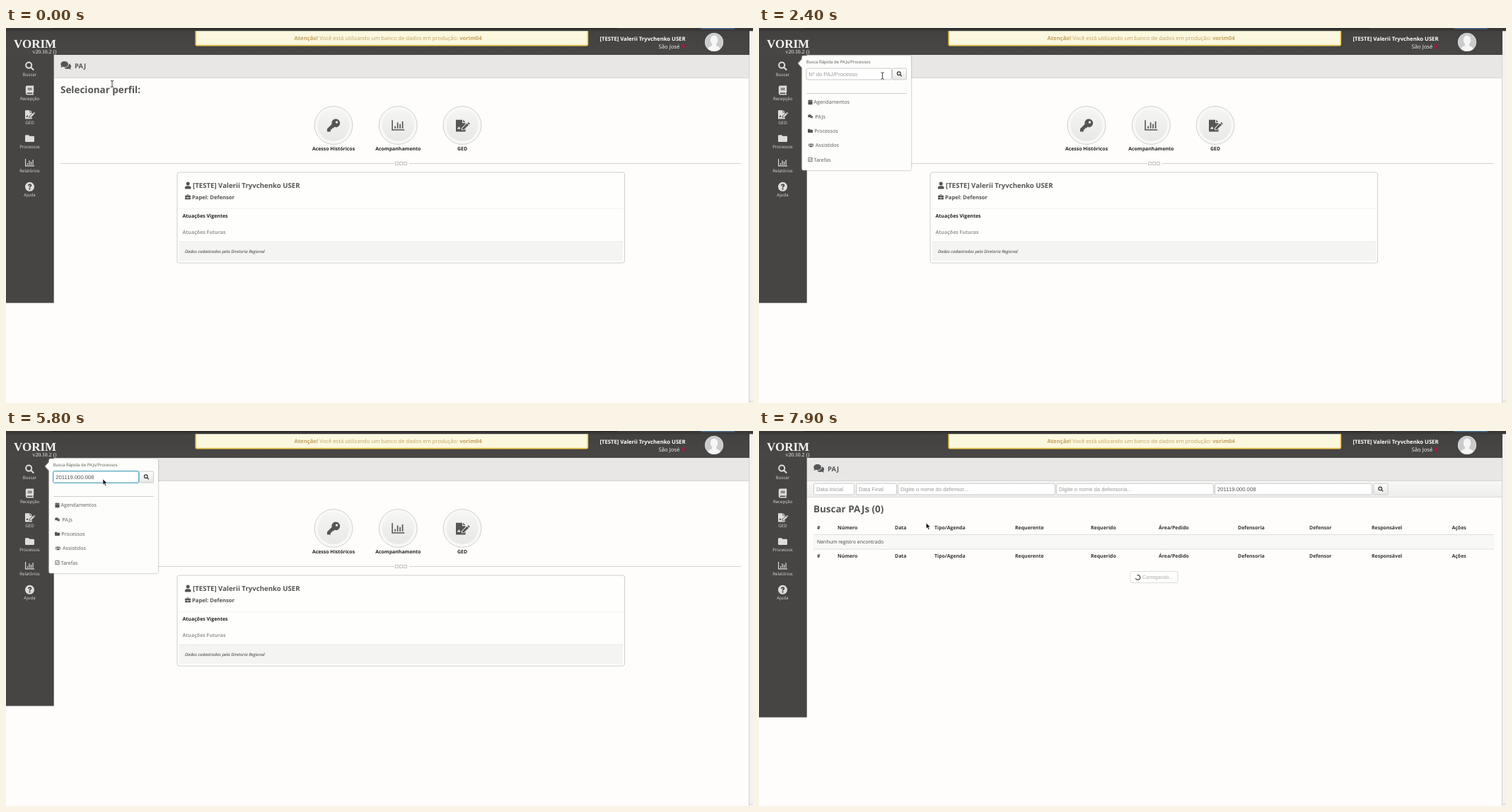
Write an HTML page that moves like this. It is 1056x530 px and loops after 8 s.

```html
<!DOCTYPE html>
<html lang="pt-BR">
<head>
<meta charset="utf-8">
<title>PAJ</title>
<style>
html, body { margin: 0; width: 100%; height: 100%; overflow: hidden; background: #fefdfb; }
svg { display: block; width: 1056px; height: 530px; }
text { font-family: "Open Sans", "Noto Sans", sans-serif; text-rendering: geometricPrecision; white-space: pre; }
.b { font-weight: 700; }
.i { font-style: italic; }
.m { text-anchor: middle; }
.e { text-anchor: end; }
.a { font-family: "Liberation Sans", Arial, sans-serif; }
.s { font-family: "Liberation Serif", Times, serif; }
</style>
</head>
<body>
<svg id="stage" viewBox="0 0 1056 530" xmlns="http://www.w3.org/2000/svg"></svg>
<script>
const DARK = '#464543', INK = '#555', PALE = '#dedddb', LINE = '#d3d3d1';

const text = (x, y, size, fill, str, cls = '') =>
  `<text x="${x}" y="${y}" font-size="${size}" fill="${fill}" class="${cls}">${str}</text>`;
const rect = (x, y, w, h, fill, more = '') =>
  `<rect x="${x}" y="${y}" width="${w}" height="${h}" fill="${fill}" ${more}/>`;
const line = (x1, y, x2, color, more = '') =>
  `<path d="M${x1} ${y}H${x2}" stroke="${color}" ${more}/>`;
const group = (id, body) => `<g id="${id}">${body}</g>`;

// Icons live in a 16 x 16 box and take their colour from the group
const fill = d => `<path fill="currentColor" fill-rule="evenodd" d="${d}"/>`;
const pen = (d, w) => `<path fill="none" stroke="currentColor" stroke-width="${w}" d="${d}"/>`;
const icons = {
  search: pen('M11.4 6.5a5 5 0 1 1-10 0a5 5 0 1 1 10 0M10 10L15 15', 2.5),
  book: fill('M3.5 0H15V12H14V14.5H15V16H3.5Q1 16 1 13.5V2.5Q1 0 3.5 0ZM4.5 4V5.2H12V4ZM4.5 6.5V7.7H12V6.5ZM4 12.3a1 1 0 0 0 0 2H12.5V12.3Z'),
  sign: fill('M0 1H8V5H12V6.5L7 11.5V14H10.5L12 12.5V16H0ZM2 12.7H5.5V11.7L4 9.5L2 11.7ZM9 1L12 4H9ZM8 11.8L14 5.6L16 7.6L10 13.4H8ZM14.6 5L15.6 4L17.6 6L16.6 7Z'),
  folder: fill('M1.5 2H6L8 4H14.5Q16 4 16 5.5V12.5Q16 14 14.5 14H1.5Q0 14 0 12.5V3.5Q0 2 1.5 2Z'),
  chart: pen('M.7 1.5V13.8H16', 1.4) + pen('M4.3 12V9M7.4 12V4.5M10.5 12V6.5M13.6 12V3', 1.5),
  help: fill('M8 0a8 8 0 1 1 0 16a8 8 0 1 1 0-16ZM4.5 5.5L6.5 6.7Q7 5.2 8.2 5.2Q9.2 5.4 8.9 6.4Q6.7 7.6 6.9 9.5H9.2Q9.2 8.5 11 7.4Q12.1 5 10.4 3.7Q6.6 1.9 4.5 5.5ZM8 10.5a1.4 1.4 0 1 0 .01 0Z'),
  key: fill('M10.8 0a5.2 5.2 0 1 1-1.6 10.1L7.8 11.5H6V13.3H4.3V16H0V12.4L5.8 6.6A5.2 5.2 0 0 1 10.8 0ZM12 2.6a1.5 1.5 0 1 0 .01 0Z'),
  chat: fill('M6 1.5C9.5 1.5 11.6 3.6 11.6 6S9.5 10.4 6 10.4Q4.5 10.4 3.4 9.9Q1.8 11 0 11Q1.2 9.8 1.3 8.6Q.2 7.4 .2 6C.2 3.6 2.5 1.5 6 1.5ZM12.6 5.3C15 6 16 7.4 16 9Q16 10.5 14.9 11.6Q15 12.8 16.2 14Q14.2 14 12.7 12.9C9.4 13.7 6.8 12.9 5.6 11.4C9.7 11.4 12.8 8.8 12.6 5.3Z'),
  user: fill('M8 0a4 4 0 1 1 0 8a4 4 0 1 1 0-8ZM5 9H11Q15 9.4 15 13V14.5Q15 16 13.5 16H2.5Q1 16 1 14.5V13Q1 9.4 5 9Z'),
  case: fill('M5 4V2.5Q5 1 6.5 1H9.5Q11 1 11 2.5V4H16V9H0V4ZM6.5 4H9.5V2.5H6.5ZM0 10H6V11.5H10V10H16V15H0Z'),
  date: fill('M1 2H4V0H6V2H10V0H12V2H15V5H1ZM1 6H15V16H1Z'),
  users: fill('M8 2a3 3 0 1 1 0 6a3 3 0 1 1 0-6ZM6 9H10Q13 9.5 13 13.5H3Q3 9.5 6 9ZM2.3 3a2 2 0 1 1 0 4a2 2 0 1 1 0-4ZM13.7 3a2 2 0 1 1 0 4a2 2 0 1 1 0-4ZM-1 11Q-1 8 1 8H4Q2.3 9 2 11ZM17 11Q17 8 15 8H12Q13.7 9 14 11Z'),
  check: pen('M2 2H14V14H2Z', 1.8) + pen('M4.5 7.5L7.3 10.3L12 5.3', 2),
  pin: fill('M8 0a5 5 0 0 1 5 5Q13 9 8 16Q3 9 3 5a5 5 0 0 1 5-5Z'),
  down: pen('M2 5L8 11L14 5', 3)
};
const icon = (name, cx, cy, size, color) =>
  `<g color="${color}" transform="translate(${cx - size / 2} ${cy - size / 2}) scale(${size / 16})">${icons[name]}</g>`;

const input = (x, y, w, h, stroke = '#c9c9c7') =>
  rect(x + .5, y + .5, w - 1, h - 1, '#fff', `rx="1.5" stroke="${stroke}"`);
const searchButton = (x, y, h) =>
  rect(x + .5, y + .5, 20, h - 1, 'url(#btn)', 'rx="1.5" stroke="#cbcbc9"') + icon('search', x + 10.5, y + h / 2, 7.5, '#333');

const defs = `<defs>
  <linearGradient id="top" x2="0" y2="1"><stop stop-color="#424140"/><stop offset="1" stop-color="#484745"/></linearGradient>
  <linearGradient id="btn" x2="0" y2="1"><stop stop-color="#fff"/><stop offset="1" stop-color="#e8e8e6"/></linearGradient>
  <linearGradient id="bar" x2="0" y2="1"><stop stop-color="#f8f8f6"/><stop offset="1" stop-color="#ededeb"/></linearGradient>
  <linearGradient id="disc" x2="0" y2="1"><stop stop-color="#f5f5f3"/><stop offset="1" stop-color="#e8e8e6"/></linearGradient>
  <filter id="shade" x="-10%" y="-10%" width="120%" height="120%"><feDropShadow dx="0" dy="0" stdDeviation="1.3" flood-color="#949492"/></filter>
  <filter id="glow" x="-10%" y="-40%" width="120%" height="180%"><feDropShadow dx="0" dy="0" stdDeviation="1.3" flood-color="#3fa9c9" flood-opacity=".7"/></filter>
  <clipPath id="face"><circle cx="1001" cy="20" r="13"/></clipPath>
</defs>`;

function header() {
  const banner = `<text x="540" y="17.2" font-size="7.7" fill="#c3a25e" class="m"><tspan class="b">Atenção!</tspan> Você está utilizando um banco de dados em produção: <tspan class="b">vorim04</tspan></text>`;
  return rect(0, 0, 1051, 38, 'url(#top)') + rect(0, 0, 1056, 4.3, '#393837') + rect(64, 0, 800, 1.2, '#252525') +
    rect(982, 0, 48, 1.5, '#44698c', 'rx="1"') +
    '<path d="M268.3 4.3V22.8Q268.3 24.6 270 24.6H820.5Q822.3 24.6 822.3 22.8V4.3" fill="#fcf8e0" stroke="#f1ca55" stroke-width="1.7"/>' +
    banner +
    text(11, 27.6, 17, '#f4f4f2', 'VORIM', 's b') + text(71.5, 36, 7.7, '#f4f4f2', 'v20.10.2 ()', 's e') +
    text(960.5, 17.8, 7.7, '#fff', '[TESTE] Valerii Tryvchenko USER', 'b e') +
    text(922.5, 29.3, 7.7, '#f4f4f2', 'São José') + icon('pin', 957.3, 26.5, 8, '#8f2440') +
    `<g clip-path="url(#face)">${rect(988, 7, 26, 26, '#cbcbcb')}
      <ellipse cx="1001" cy="17" rx="5.2" ry="6.6" fill="#f6f6f6"/>
      <path d="M998 21H1004V25Q1010 27 1012 33H990Q992 27 998 25Z" fill="#f6f6f6"/></g>
    <circle cx="1001" cy="20" r="12.7" fill="none" stroke="#dcdcda" stroke-width=".8"/>`;
}

function sidebar() {
  const items = [['search', 'Buscar'], ['book', 'Recepção'], ['sign', 'GED'], ['folder', 'Processos'], ['chart', 'Relatórios'], ['help', 'Ajuda']];
  return `<rect id="side" y="37" width="67.7" fill="${DARK}"/>` + items.map(([name, label], i) =>
    icon(name, 33.5, 53.8 + 34.1 * i, 13, PALE) + text(33.5, 67.6 + 34.1 * i, 6.1, PALE, label, 'm')).join('');
}

const titleBar = () => rect(67.7, 38, 982.3, 33, '#e8e7e6') + line(67.7, 70.5, 1050, '#d6d5d3') +
  icon('chat', 84.6, 53, 15, INK) + text(97, 57.3, 9.4, INK, 'PAJ', 'b');

function profile() {
  const discs = [['key', 463, 'Acesso Históricos'], ['chart', 554.3, 'Acompanhamento'], ['sign', 645, 'GED']];
  return text(77, 92.4, 13.45, INK, 'Selecionar perfil:', 'b') +
    discs.map(([name, x, label]) =>
      `<circle cx="${x}" cy="137.5" r="26.9" fill="#f8f8f6" stroke="#cfcfcd"/>
       <circle cx="${x}" cy="137.5" r="22.5" fill="url(#disc)"/>` +
      icon(name, x, 137.5, 18, INK) + text(x, 172.8, 6.95, '#222', label, 'b m')).join('') +
    line(77, 191.5, 549, LINE) + line(570, 191.5, 1039, LINE) +
    [550.5, 556.5, 562.5].map(x => rect(x, 189.5, 4, 4, 'none', 'stroke="#c4c4c2"')).join('') +
    rect(242, 204, 632.5, 128, '#fefefc', 'rx="3" stroke="#cfcfcd"') +
    icon('user', 257.2, 222.5, 10, INK) + text(264, 226.1, 9.63, INK, '[TESTE] Valerii Tryvchenko USER', 'b') +
    icon('case', 257, 238.8, 8, INK) + text(263, 241.6, 7.65, INK, 'Papel: Defensor', 'b') +
    line(245, 255.5, 872, '#e6e6e4', 'stroke-dasharray="1 1"') +
    text(249.5, 267.6, 7, '#222', 'Atuações Vigentes', 'b') + text(249.5, 290.6, 7, '#999', 'Atuações Futuras', 'b') +
    rect(245, 302, 627, 27, '#f4f4f2') + line(245, 302, 872, '#d9d9d7', 'stroke-dasharray="1 1"') +
    text(253, 317.7, 6, '#333', 'Dados cadastrados pela Diretoria Regional', 'i');
}

function results() {
  const fields = [[77, 58, 'Data Inicial'], [137, 58, 'Data Final'], [196, 223, 'Digite o nome do defensor...'],
    [420, 223, 'Digite o nome da defensoria...'], [644, 223, '201119.000.008']];
  const cols = [[82, '#'], [111, 'Número'], [192, 'Data'], [248, 'Tipo/Agenda'], [362, 'Requerente'], [469, 'Requerido'],
    [565, 'Área/Pedido'], [677, 'Defensoria'], [778, 'Defensor'], [866, 'Responsável'], [979.5, 'Ações']];
  const heads = y => cols.map(([x, s]) => text(x, y, 6.95, '#333', s, 'b')).join('');
  const table = heads(105.8) + rect(77, 113.5, 962, 20.5, '#f8f8f6') +
    line(77, 113.5, 1039, '#dededc') + line(77, 134, 1039, '#dededc') +
    text(82, 126.2, 6.95, '#444', 'Nenhum registro encontrado') + heads(146.3);
  const loading = rect(485.5, 165.5, 67, 16, '#fefefc', 'rx="2" stroke="#dcdcda"') +
    '<circle id="spin" cx="496" cy="174" r="3.3" fill="none" stroke="#444" stroke-width="1.2" pathLength="4" stroke-dasharray="3 1"/>' +
    text(502.5, 176, 7.15, '#aaa', 'Carregando...', 'a');
  const more = icon('down', 563.8, 173.4, 7, '#1b86b5') + text(569, 176.2, 7.7, '#1b86b5', 'Carregar mais...', 'a');
  return rect(68, 71, 982, 22.5, 'url(#bar)') + line(68, 93.5, 1050, '#dcdcda') +
    fields.map(([x, w, s], i) => input(x, 73.7, w, 16.8) + text(x + 4, 84.8, 7.7, i < 4 ? '#999' : INK, s, 'a')).join('') +
    searchButton(868.5, 73.7, 16.8) +
    group('heading', text(77, 115.2, 13.45, INK, 'Buscar PAJs (0)', 'b')) +
    group('table', table) + group('loading', loading) + group('more', more);
}

function popup() {
  const items = [['date', 77.5, 'Agendamentos'], ['chat', 79.3, 'PAJs'], ['folder', 78.3, 'Processos'], ['users', 80, 'Assistidos'], ['check', 77.5, 'Tarefas']];
  return '<path d="M62.5 39.3H213Q215 39.3 215 41.3V199Q215 201 213 201H62.5Q60.7 201 60.7 199V56L55.2 50L60.7 44V41.3Q60.7 39.3 62.5 39.3Z" fill="#fdfdfb" filter="url(#shade)"/>' +
    text(66.7, 49.6, 6.05, INK, 'Busca Rápida de PAJs/Processos') +
    searchButton(188, 56.5, 17) + input(66.5, 56.5, 121.5, 17) +
    group('focus', `<g filter="url(#glow)">${input(66.5, 56.5, 121.5, 17, '#5aa9bd')}</g>`) +
    group('hint', text(70.2, 67.7, 7.7, '#999', 'Nº do PAJ/Processo', 'a')) +
    group('typed', text(70.2, 67.7, 7.7, INK, '201119.000.008', 'a')) +
    rect(70, 60, .8, 10, '#222', 'id="caret"') +
    line(67, 92.5, 209, '#cfcfcd') +
    items.map(([name, x, label], i) => icon(name, name == 'users' ? 73.5 : 72.5, 104.7 + 20.35 * i, 7, INK) +
      text(x, 107.4 + 20.35 * i, 7.15, INK, label)).join('');
}

const tooltip = () => rect(15, 75, 37, 11.5, '#3a3937', 'rx="1" opacity=".85"') + text(33.5, 82.7, 6.05, '#fff', 'Pesquisar', 'm');

const cursors = {
  beam: '<path d="M-2.2-4.7Q0-4.7 0-3.5Q0-4.7 2.2-4.7M0-4V4M-2.2 4.7Q0 4.7 0 3.5Q0 4.7 2.2 4.7" fill="none" stroke="#333" stroke-width=".9"/>',
  arrow: '<path d="M0 0V8L1.9 6.3L3.3 9.4L4.7 8.8L3.3 5.8H6Z" fill="#111" stroke="#fff" stroke-width=".5"/>',
  hand: '<path d="M-1.3-4Q-.4-5 .3-4V-1L3.6-.2Q4.6.2 4.4 1.5L3.6 5H-1.2L-3.6 1.4Q-3.6.2-2.4.7L-1.3 1.6Z" fill="#111" stroke="#fff" stroke-width=".6"/>'
};

const stage = document.getElementById('stage');
stage.innerHTML = defs + rect(0, 0, 1056, 530, '#fefdfb') + rect(1050, 4, 6, 526, '#f3f2f0') +
  '<path d="M1050.5 4V530M1050 527.5H1056" stroke="#d4d3d1"/>' +
  titleBar() + group('profile', profile()) + group('results', results()) + sidebar() + header() +
  group('tip', tooltip()) + group('popup', popup()) +
  Object.keys(cursors).map(k => group(k, cursors[k])).join('');

const $ = id => document.getElementById(id);
const show = (id, on) => $(id).setAttribute('display', on ? 'inline' : 'none');
const move = (id, x, y) => $(id).setAttribute('transform', `translate(${x} ${y})`);

// Pointer path: time, x, y
const path = [[0, 150, 79], [400, 150, 79], [700, 33.5, 56.5], [1300, 33.5, 56.5], [1700, 184, 67], [2300, 184, 67],
  [2500, 165, 68], [2700, 184, 68.5], [2800, 184, 68.5], [2900, 123, 69], [3000, 137, 69], [4700, 137, 69],
  [4800, 137, 68], [7000, 137, 68], [7700, 236.3, 130], [8000, 236.3, 130]];
function pointer(t) {
  const i = path.findIndex(p => p[0] > t), [t0, x0, y0] = path[i - 1], [t1, x1, y1] = path[i];
  const k = (t - t0) / (t1 - t0);
  return [x0 + (x1 - x0) * k, y0 + (y1 - y0) * k];
}

const between = (t, a, b) => t >= a && t < b;

function draw(t) {
  const loaded = t >= 6500, done = t >= 7100, typed = t >= 4000;
  show('profile', !loaded);
  show('results', loaded);
  $('side').setAttribute('height', (done ? 404.7 : loaded ? 368.7 : 388.6) - 37);

  const left = Math.max(0, 1 - Math.max(0, t - 700) / 800) ** 2;
  show('popup', t > 700 && !loaded);
  $('popup').setAttribute('opacity', 1 - left);
  move('popup', -10 * left, 0);
  show('tip', between(t, 900, 1400));
  show('focus', t >= 2600);
  show('hint', !typed);
  show('typed', typed);
  show('caret', between(t, 2700, 3200) || between(t, 3600, 4600) || between(t, 5300, 5800));
  $('caret').setAttribute('x', typed ? 125.6 : 70);

  show('heading', done);
  show('more', !done);
  move('table', 0, done ? 33 : 0);
  move('loading', done ? 39.5 : 0, done ? 33 : 0);
  $('spin').setAttribute('transform', `rotate(${(t - 6500) * .18} 496 174)`);

  const shape = t < 500 || between(t, 1500, 4800) ? 'beam' : between(t, 700, 1500) ? 'hand' : 'arrow';
  for (const k in cursors) show(k, k === shape);
  move(shape, ...pointer(t));
}

const start = performance.now();
function tick() {
  draw(Math.floor((performance.now() - start) % 8000 / 100) * 100);
  requestAnimationFrame(tick);
}
tick();
</script>
</body>
</html>
```
